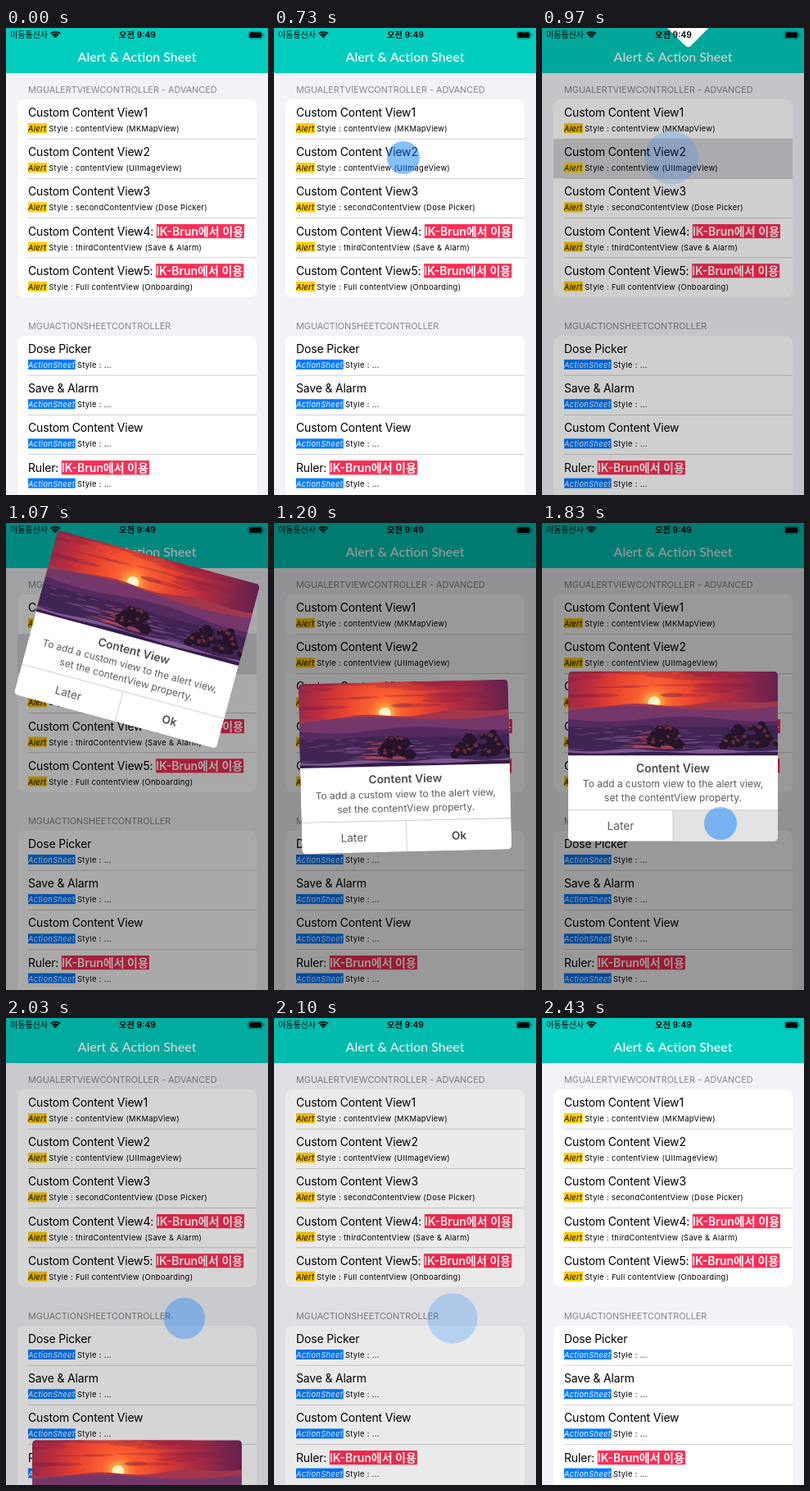
Animation, 320 px wide and 569 px high, one loop 2.49 s. Source, as an HTML page with a canvas:

```html
<!DOCTYPE html>
<html lang="ko">
<head>
<meta charset="utf-8">
<style>
html, body { margin: 0; width: 100%; height: 100%; overflow: hidden; background: #f2f2f7; }
canvas { display: block; width: 320px; height: 569px; }
</style>
</head>
<body>
<canvas id="stage"></canvas>
<script>
const W = 320, H = 569, LOOP = 2490, TICK = 100 / 3;
const SANS = 'Inter, "Noto Sans CJK KR", "Noto Sans CJK JP", sans-serif';
const canvas = document.getElementById('stage');
const ctx = canvas.getContext('2d');
const ratio = window.devicePixelRatio || 1;
canvas.width = W * ratio;
canvas.height = H * ratio;

const ROW = 48.2, INSET = 27;
const TAG = 'IK-Brun에서 이용', TAG_WIDTH = 107;
const ALERT = { w: 256, h: 207, x: 160, y: 284.5, picture: 102.5 };

const sections = [
  {
    y: 87, header: 'MGUALERTVIEWCONTROLLER - ADVANCED',
    kind: 'Alert', badge: '#ffcc00', ink: '#000',
    titles: ['Custom Content View1', 'Custom Content View2', 'Custom Content View3',
      'Custom Content View4: ', 'Custom Content View5: '],
    details: ['contentView (MKMapView)', 'contentView (UIImageView)', 'secondContentView (Dose Picker)',
      'thirdContentView (Save & Alarm)', 'Full contentView (Onboarding)']
  },
  {
    y: 375, header: 'MGUACTIONSHEETCONTROLLER',
    kind: 'ActionSheet', badge: '#007aff', ink: '#fff',
    titles: ['Dose Picker', 'Save & Alarm', 'Custom Content View', 'Ruler: '],
    details: []
  }
];

const clamp = v => Math.max(0, Math.min(1, v));

function rect(x, y, w, h, color) {
  ctx.fillStyle = color;
  ctx.fillRect(x, y, w, h);
}

function roundPath(x, y, w, h, r) {
  ctx.beginPath();
  ctx.roundRect(x, y, w, h, r);
}

function ellipse(x, y, rx, ry, color) {
  ctx.fillStyle = color;
  ctx.beginPath();
  ctx.ellipse(x, y, rx, ry, 0, 0, Math.PI * 2);
  ctx.fill();
}

// Draws a line of text and returns its width.
function text(str, x, y, size, color, { style = '400', align = 'left', family = SANS, spacing = 0 } = {}) {
  ctx.font = `${style} ${size}px ${family}`;
  ctx.letterSpacing = spacing + 'px';
  ctx.textAlign = align;
  ctx.fillStyle = color;
  ctx.fillText(str, x, y);
  return ctx.measureText(str).width;
}

function drawRow({ kind, badge, ink }, title, detail, top) {
  const titleWidth = text(title, INSET, top + 21, 14, '#000', { spacing: -0.17 });
  if (title.endsWith(': ')) {
    const x = INSET + titleWidth;
    rect(x, top + 7.4, TAG_WIDTH, 17.2, '#ff2d55');
    text(TAG, x, top + 21, 14, '#fff', { style: '600' });
  }
  const label = { style: 'italic 400', spacing: 0.3 };
  const width = text(kind, INSET, top + 39, 9.4, ink, label) + 0.6;
  rect(INSET, top + 29, width, 12, badge);
  text(kind, INSET, top + 39, 9.4, ink, label);
  text('Style : ' + detail, INSET + width + 2.3, top + 39, 9.4, '#000', { spacing: 0.3 });
}

function drawSection(section, highlight) {
  const { y, header, titles, details } = section;
  const height = details.length ? ROW * titles.length : H;
  text(header, INSET, y - 8, 10.85, '#858589');
  ctx.save();
  roundPath(14, y, 292, height, 8.5);
  ctx.clip();
  rect(14, y, 292, height, '#fff');
  titles.forEach((title, i) => {
    const top = y + i * ROW;
    if (i === 1) rect(14, top, 292, ROW, `rgba(209,209,214,${highlight})`);
    if (i) rect(INSET, top - 0.4, 279, 0.8, '#c6c6c8');
    drawRow(section, title, details[i] || '...', top);
  });
  ctx.restore();
}

function drawStatusBar() {
  text('이동통신사', 5, 12, 10, '#000');
  text('오전 9:49', 160.5, 12.2, 10.3, '#000', { style: '600', align: 'center' });
  ctx.strokeStyle = '#000';
  ctx.lineWidth = 1.9;
  for (let r = 8; r > 1; r -= 2.9) {
    ctx.beginPath();
    ctx.arc(60.2, 12.6, r, -Math.PI * 0.75, -Math.PI * 0.25);
    ctx.stroke();
  }
  ctx.lineWidth = 0.8;
  ctx.strokeStyle = 'rgba(0,0,0,.4)';
  roundPath(295.8, 4.1, 17.6, 9, 2.6);
  ctx.stroke();
  roundPath(297, 5.3, 15.2, 6.6, 1.6);
  ctx.fill();
  rect(314.3, 7.2, 1, 2.8, 'rgba(0,0,0,.45)');
}

function randomFrom(seed) {
  return () => {
    seed = (seed * 16807) % 2147483647;
    return seed / 2147483647;
  };
}

// Fills everything below the curve y = height(x).
function land(color, height) {
  ctx.fillStyle = color;
  ctx.beginPath();
  ctx.moveTo(0, ALERT.picture);
  for (let x = 0; x <= ALERT.w; x += 4) ctx.lineTo(x, height(x));
  ctx.lineTo(ALERT.w, ALERT.picture);
  ctx.fill();
}

function boulder(x, y, r, color, random) {
  ctx.fillStyle = color;
  ctx.beginPath();
  for (let a = 0; a < 6; a++) {
    const reach = r * (0.7 + 0.5 * random());
    ctx.lineTo(x + reach * Math.cos(a * Math.PI / 3), y + reach * 0.8 * Math.sin(a * Math.PI / 3));
  }
  ctx.fill();
}

// A mound of boulders, sunlit on the upper faces.
function rocks(x, y, halfWidth, height, random) {
  for (let i = 0; i < 44; i++) {
    const side = random() * 2 - 1;
    const rise = height * (1 - side * side) * random();
    const px = x + side * halfWidth, py = y - rise, r = 4 + random() * 4;
    boulder(px, py, r, '#26142a', random);
    if (i % 2) boulder(px - 1, py - 2, r * 0.5, '#6b2c38', random);
  }
}

function drawSunset() {
  const random = randomFrom(77);
  const sun = { x: 105, y: 38 };
  const sky = ctx.createRadialGradient(sun.x, sun.y, 4, sun.x, sun.y, 165);
  ['#ffa040', '#fb6030', '#e8432f', '#b92d3d', '#86264a', '#55204e']
    .forEach((color, i, all) => sky.addColorStop((i / (all.length - 1)) ** 1.4, color));
  rect(0, 0, ALERT.w, ALERT.picture, sky);

  for (let i = 0; i < 26; i++) {
    const y = random() ** 1.5 * 30, length = 12 + random() * 30;
    ellipse(random() * ALERT.w, y, length, 1 + random() * 2, 'rgba(130,28,66,.3)');
  }
  ellipse(sun.x, sun.y, 12, 12, 'rgba(255,170,60,.5)');
  ellipse(sun.x, sun.y, 7.5, 7.5, '#fff3c4');

  land('#a2364c', x => 42 + 2 * Math.sin(x / 17) - (x / 95) ** 2);
  land('#75376a', x => 48 - 4 * Math.sin(x / 42) - x / 40);
  land('#552a60', x => 58 + 3 * Math.sin(x / 30));
  land('#402453', x => 67 + Math.sin(x / 21));

  for (let i = 0; i < 60; i++) {
    const depth = random(), y = 67 + depth * 28;
    const spread = (random() + random() - 1) * 130;
    const color = Math.abs(spread) < 28 ? 'rgba(222,88,92,.55)' : 'rgba(128,84,146,.5)';
    ellipse(sun.x + spread, y, 4 + depth * 12, 0.7, color);
  }
  rocks(117, 89, 18, 22, random);
  rocks(225, 90, 36, 30, random);
  land('#7d5690', x => 96 + 1.5 * Math.sin(x / 16));
  land('#341d48', x => 99 + Math.sin(x / 22));
}

function drawAlert(offset, pressed) {
  const { w, h, picture } = ALERT;
  ctx.save();
  ctx.translate(ALERT.x, ALERT.y + offset.y);
  ctx.rotate(offset.angle);
  ctx.translate(-w / 2, -h / 2);
  roundPath(0, 0, w, h, 5);
  ctx.clip();
  drawSunset();
  rect(0, picture, w, h - picture, '#fff');
  const middle = { align: 'center' }, strong = { align: 'center', style: '600' };
  text('Content View', 128, 123, 13.8, '#4c4c4c', strong);
  text('To add a custom view to the alert view,', 128, 141, 12, '#5c5c5c', middle);
  text('set the contentView property.', 128, 158.2, 12, '#5c5c5c', middle);
  if (pressed) rect(128, 169, 128, 38, '#e3e3e3');
  rect(0, 168.6, w, 0.8, '#c4c4c4');
  rect(127.6, 169, 0.8, 38, '#c4c4c4');
  text('Later', 64, 193.5, 13.7, '#5c5c5c', middle);
  if (!pressed) text('Ok', 192, 193.5, 13.7, '#4c4c4c', strong);
  ctx.restore();
}

function drawTouch(t, x, y, down, up) {
  const fade = clamp((t - up) / 250);
  if (t < down || fade === 1) return;
  const r = 20 + 20 * fade;
  ellipse(x, y, r, r, `rgba(0,122,255,${0.47 * (1 - fade)})`);
}

// Remaining distance (1 to 0) of an underdamped spring.
function spring(s) {
  const damping = 0.715, omega = 12, root = Math.sqrt(1 - damping * damping);
  const phase = omega * root * s;
  return Math.exp(-damping * omega * s) * (Math.cos(phase) + damping / root * Math.sin(phase));
}

// Travelled distance (0 to 1) of a critically damped spring.
function glide(s) {
  return 1 - (1 + 15 * s) * Math.exp(-15 * s);
}

function render(t) {
  const ENTER = 892, LEAVE = 1902;
  const gone = t > LEAVE ? glide((t - LEAVE) / 1000) : 0;
  const dim = 0.4 * (1 - (1 - clamp((t - ENTER) / 335)) ** 2.5) * (1 - gone);
  const highlight = t < 830 ? 0 : 1 - clamp((t - 1000) / 230);

  ctx.setTransform(ratio, 0, 0, ratio, 0, 0);
  rect(0, 0, W, H, '#f2f2f7');
  sections.forEach((section, i) => drawSection(section, i ? 0 : highlight));
  rect(0, 0, W, 55, '#00cdbe');
  text('Alert & Action Sheet', 160, 41, 16, '#fff', { style: '500', align: 'center', family: 'Lato, sans-serif' });

  if (t >= ENTER && t < 2340) {
    rect(0, 0, W, H, `rgba(0,0,0,${dim})`);
    const lag = t < LEAVE ? spring((t - ENTER) / 1000) : 0;
    drawAlert({ y: H * (gone - lag), angle: lag * Math.PI / 3 }, t >= 1830 && t < 1960);
  }
  drawStatusBar();
  drawTouch(t, 158, 158, 730, 808);
  drawTouch(t, 218, 366, 1830, 1968);
}

const start = performance.now();
function loop() {
  const t = (performance.now() - start) % LOOP;
  render(Math.floor((t + 5) / TICK) * TICK);
  requestAnimationFrame(loop);
}
loop();
</script>
</body>
</html>
```
